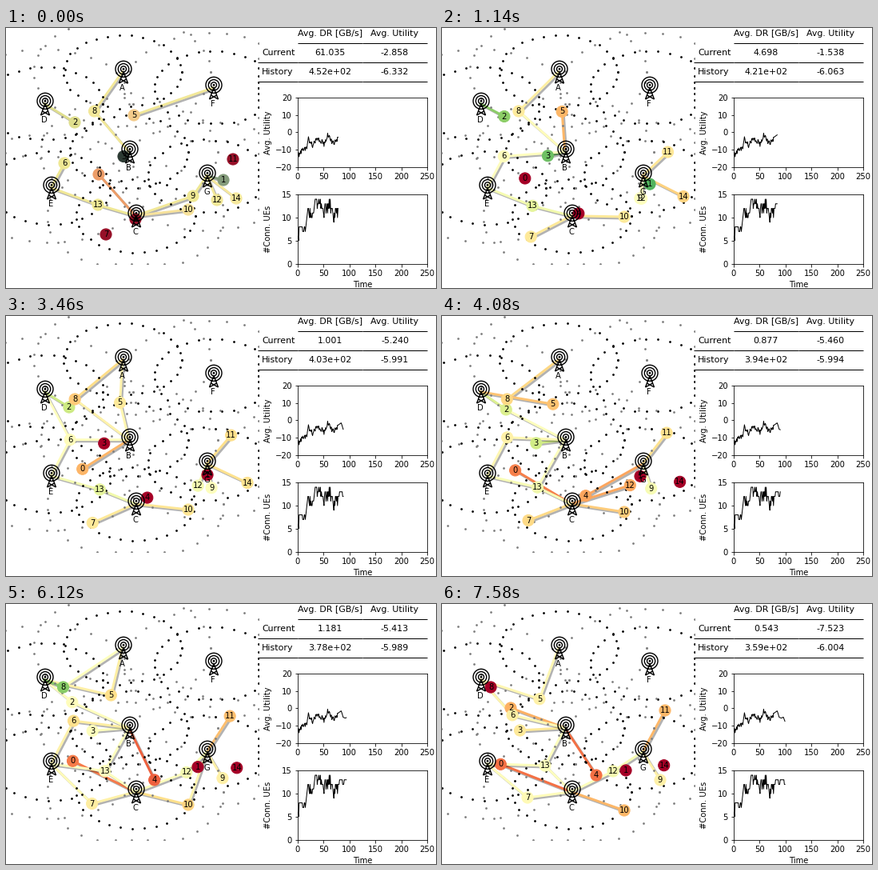
Recreate the animation shown at these times as a matplotlib script. Size 538x325 px, loop 8 s.

```python
import numpy as np
import matplotlib.pyplot as plt
import matplotlib.patheffects as pe
from matplotlib.animation import FuncAnimation
from matplotlib.colors import LinearSegmentedColormap
from matplotlib.path import Path

STAGE_W, STAGE_H, DPI = 538, 325, 72
INTERVAL, LOOP = 40, 8000
MAP_W, MAP_H = 200, 300              # simulated area
LEFT, BASE, SIM_W = -8.6, 294.75, 324.65
SCALE = np.array([SIM_W / MAP_W, 1])  # pixels per map unit
R_CONN, R_RATE = 68.925, 46.238      # reach of a link, reach of unit data rate
FADE = 3.377                         # path loss exponent
SPEED = 1.5                          # map units per step
FIRST, LAST = 78, 99

# Moments (ms) at which the simulation advances
STARTS = [0, 70, 200, 460, 790, 1140, 2270, 2870, 3200, 3460, 3810, 4080,
          4410, 4870, 5530, 6120, 6400, 6660, 6990, 7320, 7580]

STATIONS = {"A": (95, 240), "B": (100, 140), "C": (105, 60), "D": (35, 200),
            "E": (40, 95), "F": (165, 220), "G": (160, 110)}

# Start and waypoints of each user
ROUTES = [
    [(116, 183), (73, 200.5)],
    [(272, 190), (230, 208)],
    [(86, 118), (77, 109.7), (86, 130)],
    [(147, 160.5), (97.5, 158)],
    [(162, 239), (193, 214)],
    [(160, 109), (152, 103.5), (121.5, 119)],
    [(73, 169), (88.5, 138)],
    [(125, 258), (108.5, 261.5), (107, 241.5)],
    [(110.5, 104), (61, 104)],
    [(234, 210), (277.5, 219), (273, 220)],
    [(228, 227), (228, 258)],
    [(284, 164), (279, 133)],
    [(264, 215), (214, 209)],
    [(115, 221), (111, 225), (129, 202)],
    [(288, 213), (306.5, 209.8), (277, 201.5)],
]

# Links switched on or off at a step
TOGGLES = {
    78: "0C 1G 2D 3B 5F 6E 8A 8B 9C 9G 10C 12G 13C 13E 14G",
    81: "0C 5B 5F 6B 7C 9C 11G",
    85: "8A",
    87: "0B 1G 3B 5A 6D 8A",
    90: "0B 0C 2B 3B 4G 5A 5B 5D 6D 8B 12C 12G 13B 14G",
    94: "4B 4G 5A 7E 8D 10G 12G",
    98: "2D 6D 6E 8A 8D 10G",
}

# Step, mean rate, mean utility, mean utility so far
STATS = [(78, 61.035, -2.858, -6.332), (84, 4.698, -1.538, -6.063),
         (85, 4.190, -2.254, -6.019), (88, 1.001, -5.240, -5.991),
         (92, .754, -5.679, -5.996), (96, 1.608, -5.148, -5.983),
         (99, .543, -7.523, -6.004)]

UTIL_TREND = [(0, -14), (9, -10.5), (17, -10), (21, -4), (29, -8), (38, -3.5),
              (52, -7), (58, -2), (69, -6.5), (77, -3.5)]
CONN_TREND = [(0, 5), (4, 8), (16, 8), (21, 12), (28, 10), (33, 13.5),
              (43, 13), (50, 11), (62, 13), (69, 9.5), (77, 11.5)]

FULL = plt.get_cmap("RdYlGn")
DULL = LinearSegmentedColormap.from_list("dull", [
    "#961028", "#e87e50", "#f8e8a0", "#ece890", "#7f9779", "#2c3a33"])


def to_px(x, y):
    return LEFT + SCALE[0] * x, BASE - y


def ring(x, y, radius):
    """Dots around a station, held inside the map."""
    a = np.linspace(1e-6, 2 * np.pi, 32)
    c, s = np.cos(a), np.sin(a)
    edge = np.minimum(np.where(c > 0, (MAP_W - x) / c, -x / c),
                      np.where(s > 0, (MAP_H - y) / s, -y / s))
    d = np.minimum(np.floor(radius * 99 / edge), 99) * edge / 99
    return to_px(x + d * c, y + d * s)


def walk(route):
    """Positions at each step, at constant speed from waypoint to waypoint."""
    points = [np.array(p, float) for p in route]
    pos, goals, track = points[0], points[1:], []
    for _ in range(FIRST, LAST + 1):
        track.append(pos)
        if goals:
            gap = goals[0] - pos
            dist = np.hypot(*(gap / SCALE))
            pos = goals.pop(0) if dist <= SPEED else pos + gap * SPEED / dist
    return track


def links_at(t):
    """(user, station) pairs active at step t, ordered by station."""
    active = set()
    for step, tokens in TOGGLES.items():
        if step <= t:
            active ^= set(tokens.split())
    return sorted(((int(s[:-1]), s[-1]) for s in active),
                  key=lambda p: (p[1], p[0]))


def past(trend, spread):
    t = np.arange(FIRST)
    return np.interp(t, *zip(*trend)) + rng.uniform(-spread, spread, FIRST)


def add_axes(x, top, w, h):
    return fig.add_axes([x / STAGE_W, 1 - (top + h) / STAGE_H,
                         w / STAGE_W, h / STAGE_H])


def tower():
    rings = [Path.circle((.5, 4.2), r) for r in (10, 6.7, 3.5, .7)]
    legs = [[(-5, -13.5), (.5, 1), (6, -13.5)],
            [(-5, -13.5), (4, -8.5)], [(6, -13.5), (-3, -8.5)]]
    return Path.make_compound_path(*rings, *[Path(p) for p in legs])


rng = np.random.default_rng(4)
steps, rates, utils, util_means = zip(*STATS)
now = np.arange(FIRST, LAST + 1)
utility = np.append(past(UTIL_TREND, 1.6), np.interp(now, steps, utils))
connected = np.append(np.clip(np.round(past(CONN_TREND, 1.4)), 5, 14),
                      [len({u for u, _ in links_at(t)}) for t in now])
tracks = np.array([walk(r) for r in ROUTES])
masts = {k: to_px(*p) for k, p in STATIONS.items()}

fig = plt.figure(figsize=(STAGE_W / DPI, STAGE_H / DPI), dpi=DPI,
                 facecolor="white")

# Map
sim = add_axes(LEFT, BASE - MAP_H, SIM_W, MAP_H)
sim.axis("off")
shadow = [pe.SimpleLineShadow(shadow_color="black"), pe.Normal()]
lines = [sim.plot([], [], lw=3, zorder=-1, path_effects=shadow)[0]
         for _ in range(26)]
users = sim.scatter(*tracks[:, 0].T, s=200, zorder=2)
tags = [sim.text(0, 0, str(i), ha="center", va="center", zorder=3)
        for i in range(len(ROUTES))]
mark = tower()
mark_size = 2 * np.abs(mark.vertices).max()
for name, (x, y) in STATIONS.items():
    sim.plot(*masts[name], marker=mark, ms=mark_size, mfc="none", mec="black",
             mew=1.4, ls="")
    sim.annotate(name, masts[name], xytext=(0, -25), ha="center", va="bottom",
                 textcoords="offset points")
    sim.scatter(*ring(x, y, R_CONN), color="gray", s=3)
    sim.scatter(*ring(x, y, R_RATE), color="black", s=3)
sim.set_xlim(LEFT, LEFT + SIM_W)
sim.set_ylim(BASE, BASE - MAP_H)

# Dashboard
dash = add_axes(364.75, -5.25, 162.33, 57.7)
dash.axis("off")
table = dash.table([["", ""], ["", ""]], rowLabels=["Current", "History"],
                   colLabels=["Avg. DR [GB/s]", "Avg. Utility"],
                   cellLoc="center", edges="B", loc="upper center",
                   bbox=[0, -.25, 1, 1.25])
table.auto_set_font_size(False)
table.set_fontsize(11)


def chart(top, label, pad, low, high, ticks):
    ax = add_axes(364.75, top, 162.33, 86.54)
    ax.set_xlim(0, 250)
    ax.set_ylim(low, high)
    ax.set_xticks(range(0, 251, 50))
    ax.set_yticks(ticks)
    ax.set_ylabel(label, labelpad=pad)
    return ax, ax.plot([], [], lw=1, color="black")[0]


_, util_line = chart(87.05, "Avg. Utility", 4, -20, 20, range(-20, 21, 10))
conn_ax, conn_line = chart(208.2, "#Conn. UEs", 12.4, 0, 15, range(0, 16, 5))
conn_ax.set_xlabel("Time")


def data_rates(pairs, pos):
    """Length and data rate of each link; a station splits its time evenly."""
    names = [m for _, m in pairs]
    dist = np.array([np.hypot(*((pos[u] - masts[m]) / SCALE))
                     for u, m in pairs])
    load = np.array([names.count(m) for m in names])
    return dist, (R_RATE / dist) ** FADE / load


def update(k):
    i = np.searchsorted(STARTS, k * INTERVAL + 30, side="right") - 1
    t = FIRST + 1 + i if i else FIRST
    cmap = FULL if i else DULL

    pos = tracks[:, t - FIRST]
    pairs = links_at(t)
    dist, rate = data_rates(pairs, pos)
    total = np.bincount([u for u, _ in pairs], rate, len(pos))
    level = np.clip(.5 + np.log10(np.maximum(total, 1e-9)) / 4, 0, 1)

    for line in lines:
        line.set_data([], [])
    for line, (u, m), d, r in zip(lines, pairs, dist, rate):
        share = r / total[u] if d < R_CONN else 0
        line.set_data(*zip(pos[u], masts[m]))
        line.set_color(cmap(.5 + share * (level[u] - .5)))
    users.set_offsets(pos)
    users.set_color(cmap(level))
    for tag, p in zip(tags, pos):
        tag.set_position(p)

    util_line.set_data(np.arange(t + 1), utility[:t + 1])
    conn_line.set_data(np.arange(t + 1), connected[:t + 1])
    rate_mean = (35740 + 9 * (t - FIRST)) / (t + 1)
    cells = {(1, 0): f"{np.interp(t, steps, rates):.3f}",
             (1, 1): f"{utility[t]:.3f}",
             (2, 0): f"{rate_mean:.3}",
             (2, 1): f"{np.interp(t, steps, util_means):.3f}"}
    for where, text in cells.items():
        table[where].get_text().set_text(text)
    return []


anim = FuncAnimation(fig, update, frames=LOOP // INTERVAL, interval=INTERVAL,
                     repeat=True, repeat_delay=0, blit=False)
plt.show()
```
